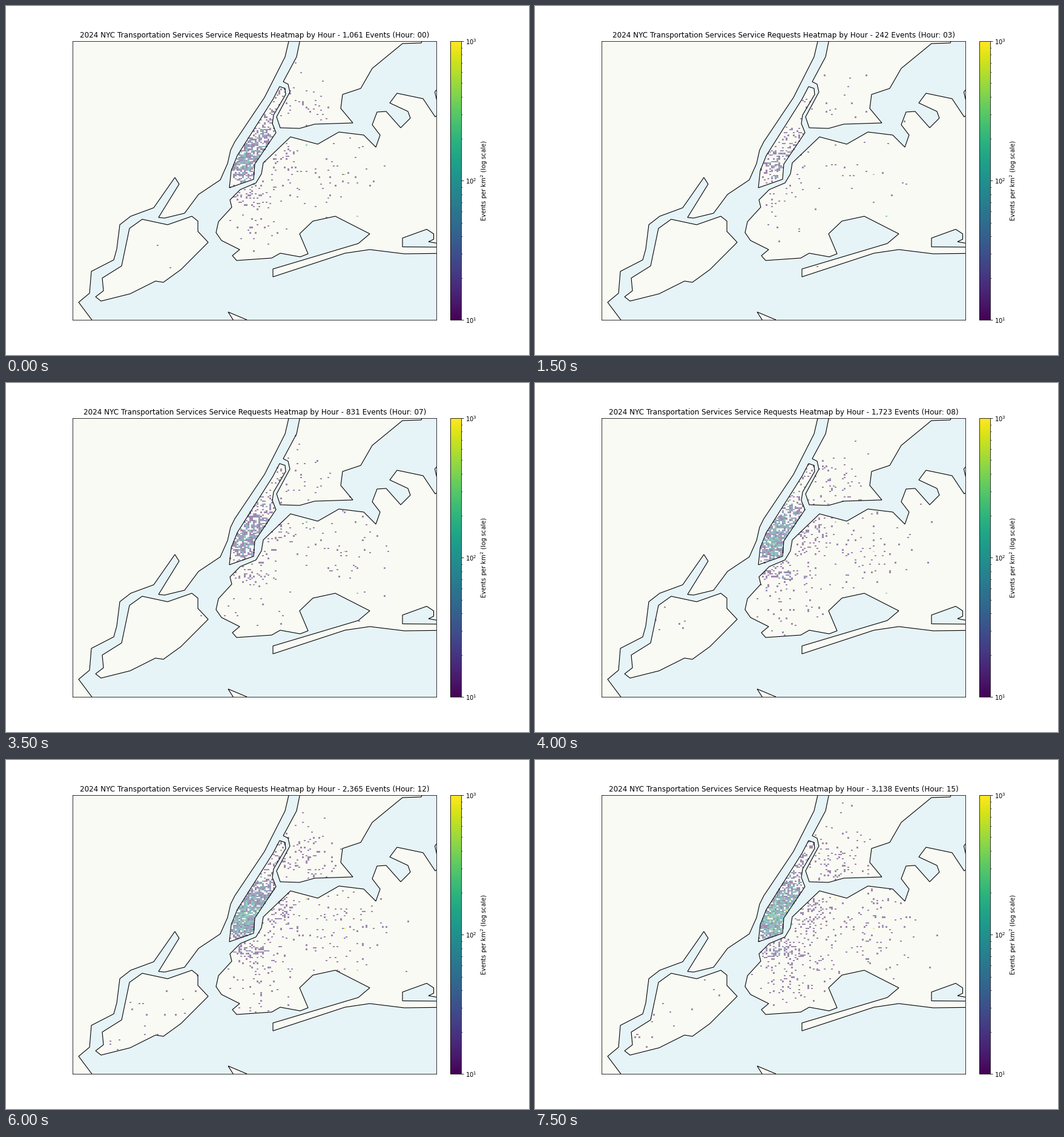
These frames come from a looping animation (864 px wide and 576 px high, 8000 ms). A matplotlib script:

```python
import numpy as np
import matplotlib.pyplot as plt
from matplotlib.animation import FuncAnimation
from matplotlib.cm import ScalarMappable
from matplotlib.colors import LogNorm
from matplotlib.path import Path

W, H, DPI = 864, 576, 72
LEFT, RIGHT, TOP, BOTTOM = 110.4, 711.4, 58.2, 518.4
HOURS, BINS = 16, 200
PER_KM2 = 14  # density of a single event in one cell
WATER, LAND = "#e6f3f7", "#fafaf4"

# Key points of the coasts, in stage pixels
MAINLAND = [
    (60, 50), (469, 50), (461, 84), (427, 151), (378, 224), (371, 238),
    (366, 260), (354, 287), (318, 311), (295, 342), (262, 350), (252, 349),
    (286, 294), (279, 283), (244, 333), (206, 347), (188, 361), (183, 401),
    (178, 419), (141, 438), (138, 474), (120, 489), (147, 525), (60, 525)]
MANHATTAN = [
    (369, 300), (372, 272), (382, 247), (441, 154), (452, 133), (461, 136),
    (462, 146), (442, 180), (440, 194), (446, 209), (411, 261), (409, 286)]
BRONX = [
    (487, 50), (480, 84), (458, 125), (466, 129), (469, 142), (447, 183),
    (453, 201), (485, 202), (510, 195), (573, 193), (553, 169), (556, 146),
    (586, 136), (605, 103), (655, 62), (686, 61), (690, 50)]
LONG_ISLAND = [
    (740, 160), (709, 183), (689, 153), (646, 144), (634, 160), (664, 174),
    (668, 185), (652, 201), (628, 174), (613, 175), (605, 196), (618, 213),
    (611, 233), (591, 213), (550, 208), (515, 228), (470, 216), (425, 259),
    (422, 277), (413, 292), (387, 303), (370, 320), (373, 332), (351, 356),
    (347, 374), (356, 387), (386, 402), (374, 412), (381, 420), (439, 416),
    (453, 408), (486, 414), (499, 409), (485, 376), (507, 355), (544, 347),
    (601, 376), (582, 392), (441, 434), (441, 447), (560, 408), (601, 402),
    (658, 409), (740, 408)]
STATEN = [
    (225, 352), (267, 361), (307, 347), (317, 355), (317, 372), (334, 390),
    (289, 435), (260, 456), (247, 454), (205, 475), (157, 487), (148, 480),
    (161, 470), (159, 449), (191, 429), (204, 367)]
HOOK = [(367, 505), (398, 518), (379, 524)]
TIP = [(716, 132), (708.5, 142), (714, 166)]
INLET = [
    (720, 398), (655, 397.5), (655, 383), (695, 368.5), (706.5, 376),
    (706.5, 385), (698, 389), (720, 393)]

# Event totals grow geometrically between the turning points of the day
totals = np.exp(np.interp(
    range(HOURS), [0, 3, 5, 8, 10, 12, 15],
    np.log([1061, 242, 193, 1723, 2242, 2365, 3138]))).round().astype(int)

xs = np.linspace(LEFT, RIGHT, BINS + 1)
ys = np.linspace(TOP, BOTTOM, BINS + 1)
X, Y = np.meshgrid((xs[1:] + xs[:-1]) / 2, (ys[1:] + ys[:-1]) / 2)
CELLS = np.column_stack([X.ravel(), Y.ravel()])


def bump(cx, cy, sx, sy):
    return np.exp(-((X - cx) / sx) ** 2 / 2 - ((Y - cy) / sy) ** 2 / 2)


def field(shore, weight, spread, seed):
    """Normalised event rate per cell, with fixed local variation."""
    inside = Path(shore).contains_points(CELLS).reshape(X.shape)
    local = np.random.default_rng(seed).lognormal(0, spread, X.shape)
    rate = inside * weight * local
    return rate / rate.sum()


midtown = bump(395, 262, 13, 18) + .45 * bump(418, 232, 14, 18) + .04
north = bump(495, 165, 32, 28)
outer = (1.5 * bump(402, 314, 15, 9) + .7 * bump(452, 250, 17, 16)
         + .25 * bump(415, 330, 30, 45) + .17 * bump(545, 275, 45, 35))

# Rate field, base count, share of all events
REGIONS = [
    (field(MANHATTAN, midtown, .9, 3), 0, .74),
    (field(BRONX, north, .6, 5), 8, .025),
    (field(LONG_ISLAND, outer, .7, 8), 18, .14),
    (field(STATEN, 1, .5, 13), -1, .0055)]

# Busy single cells: x, y, base count, share of all events
HOTSPOTS = [(561, 279, 18, .013), (498, 230, 0, .02), (582, 348, 8, .008)]


def density(hour):
    rng = np.random.default_rng(100 + hour)
    n = totals[hour]
    count = np.zeros(X.shape)
    for rate, base, share in REGIONS:
        count += rng.poisson(rate * max(0, base + share * n))
    for x, y, base, share in HOTSPOTS:
        col, row = np.searchsorted(xs, x) - 1, np.searchsorted(ys, y) - 1
        count[row, col] += round(base + share * n)
    return np.ma.masked_equal(count, 0) * PER_KM2


def place(x0, x1):
    return [x0 / W, 1 - BOTTOM / H, (x1 - x0) / W, (BOTTOM - TOP) / H]


fig = plt.figure(figsize=(W / DPI, H / DPI), dpi=DPI, facecolor="white")
ax = fig.add_axes(place(LEFT, RIGHT), facecolor=WATER)
ax.set(xlim=(LEFT, RIGHT), ylim=(BOTTOM, TOP), xticks=[], yticks=[])

for shore in (MAINLAND, MANHATTAN, BRONX, LONG_ISLAND, STATEN, HOOK, TIP,
              INLET):
    fill = WATER if shore is INLET else LAND
    ax.add_patch(plt.Polygon(shore, fc=fill, ec="none", zorder=0.5))
    ax.add_patch(plt.Polygon(shore, fill=False, ec="black", lw=1.1, zorder=2))

norm = LogNorm(10, 1000)
mesh = ax.pcolormesh(xs, ys, density(0), cmap="viridis", norm=norm,
                     alpha=.5, zorder=1)
title = ax.set_title("", fontsize=12)

bar = fig.colorbar(ScalarMappable(norm, "viridis"),
                   cax=fig.add_axes(place(734.4, 752.4)))
bar.set_label("Events per km$^2$ (log scale)")


def update(hour):
    mesh.set_array(density(hour))
    title.set_text("2024 NYC Transportation Services Service Requests Heatmap "
                   f"by Hour - {totals[hour]:,} Events (Hour: {hour:02d})")
    return mesh, title


anim = FuncAnimation(fig, update, frames=HOURS, interval=500,
                     repeat=True, repeat_delay=0, blit=False)
plt.show()
```
